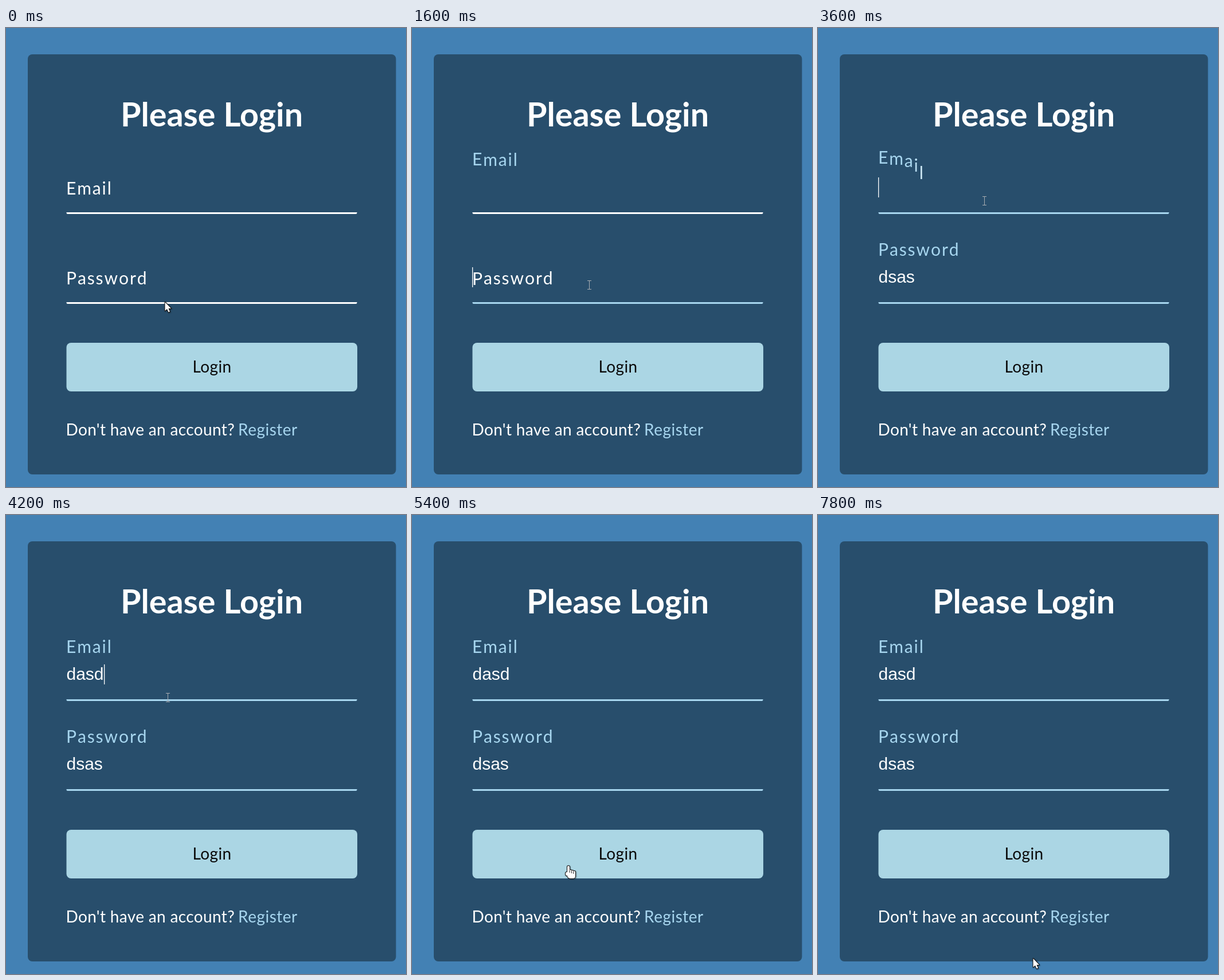
These frames come from a looping animation (698x802 px, 8000 ms). An HTML page with a canvas:

```html
<!DOCTYPE html>
<html lang="en">
<head>
<meta charset="utf-8">
<title>Login form</title>
<style>
  html, body { margin: 0; width: 100%; height: 100%; overflow: hidden; background: #4381b4; }
  canvas { display: block; }
</style>
</head>
<body>
<canvas id="stage" width="698" height="802"></canvas>
<script>
const ctx = document.getElementById('stage').getContext('2d');
const LOOP = 8000;
const FACE = 'Lato, "Open Sans", sans-serif';
const INPUT_FONT = '30px "Liberation Sans", Arial, sans-serif';
const WHITE = [255, 255, 255], SKY = [167, 214, 239];
const LEFT = 106, RIGHT = 613;
const LIFT = 50, LETTER_TIME = 350, LETTER_DELAY = 20;
const KEY_GAP = 110, GLIDE = 400;

// visits: when the field gains and loses focus
const email = { label: 'Email', base: 291, value: 'dasd', typing: 3720, visits: [[505, 1595], [3350, 5000]] };
const password = { label: 'Password', base: 448, value: 'dsas', typing: 2750, visits: [[1595, 3350]] };
const fields = [email, password];

// The pointer glides to each stop just before its time, then rests there
const stops = [
  { at: 0, x: 277, y: 478 },
  { at: 600, x: 278, y: 298 },
  { at: 1600, x: 309, y: 449 },
  { at: 2600, x: 303, y: 421 },
  { at: 3300, x: 290, y: 302 },
  { at: 4200, x: 282, y: 319 },
  { at: 5400, x: 273, y: 613 },
  { at: 5800, x: 330, y: 750 },
  { at: 6200, x: 451, y: 708 },
  { at: 7400, x: 266, y: 602 },
  { at: 7800, x: 375, y: 774 }
];

const rgb = c => `rgb(${c.map(Math.round).join()})`;
const mix = (a, b, k) => a + (b - a) * k;
const clamp = v => Math.min(1, Math.max(0, v));
const smooth = k => k * k * (3 - 2 * k);
const curve = (a, b, s) => 3 * a * s * (1 - s) ** 2 + 3 * b * s * s * (1 - s) + s ** 3;

// cubic-bezier(0.68, -0.55, 0.265, 1.55)
function backEase(x) {
  if (x <= 0) return 0;
  if (x >= 1) return 1;
  let lo = 0, hi = 1;
  for (let i = 0; i < 24; i++) {
    const mid = (lo + hi) / 2;
    if (curve(0.68, 0.265, mid) < x) lo = mid; else hi = mid;
  }
  return curve(-0.55, 1.55, lo);
}

function box(x, y, w, h, r, fill) {
  ctx.beginPath();
  ctx.roundRect(x, y, w, h, r);
  ctx.fillStyle = fill;
  ctx.fill();
}

function text(str, x, y, font, fill, align = 'left', spacing = 0) {
  ctx.font = font;
  ctx.textAlign = align;
  ctx.letterSpacing = spacing + 'px';
  ctx.fillStyle = fill;
  ctx.fillText(str, x, y);
}

function lifted({ visits, typing }, t) {
  const visit = visits.filter(([from]) => t >= from).pop();
  if (!visit) return 0;
  const [from, to] = visit;
  return t < to || t > typing
    ? backEase((t - from) / LETTER_TIME)
    : 1 - backEase((t - to) / LETTER_TIME);
}

function drawLabel(field, t) {
  let x = LEFT - 1;
  [...field.label].forEach((ch, i) => {
    const p = lifted(field, t - i * LETTER_DELAY);
    const color = rgb(WHITE.map((v, c) => mix(v, SKY[c], clamp(p))));
    text(ch, x, field.base - LIFT * p, `30px ${FACE}`, color);
    x += ctx.measureText(ch).width + 1.9;
  });
}

function drawCaret(field, value, since) {
  if (since % 1000 >= 500) return;
  const x = value ? LEFT + ctx.measureText(value).width : LEFT - 1;
  ctx.fillStyle = '#fff';
  ctx.fillRect(Math.round(x), field.base - 30, 1.3, 35);
}

function drawField(field, t) {
  const { base, typing } = field;
  const count = Math.min(field.value.length, Math.max(0, Math.ceil((t - typing) / KEY_GAP)));
  const value = field.value.slice(0, count);
  const visit = field.visits.find(([from, to]) => t >= from && t < to);
  box(LEFT - 0.5, base + 31, RIGHT - LEFT, 3, [0, 0, 2, 2], rgb(visit || value ? SKY : WHITE));
  drawLabel(field, t);
  text(value, LEFT - 0.5, base - 3, INPUT_FONT, '#fff');
  if (visit) {
    const lastKey = count ? typing + (count - 1) * KEY_GAP : visit[0];
    drawCaret(field, value, t - Math.max(visit[0], lastKey));
  }
}

function pointerAt(t) {
  const i = stops.findIndex(s => s.at > t);
  if (i < 0) return stops[stops.length - 1];
  const a = stops[i - 1], b = stops[i];
  const k = smooth(clamp(1 - (b.at - t) / GLIDE));
  return { x: mix(a.x, b.x, k), y: mix(a.y, b.y, k) };
}

function drawBeam() {
  ctx.fillStyle = '#a9aeb2';
  ctx.fillRect(0, -7, 1, 14);
  for (const y of [-8, 7]) ctx.fillRect(-3, y, 7, 1);
}

function outline(shape) {
  ctx.lineWidth = 2;
  ctx.lineJoin = 'round';
  ctx.strokeStyle = '#111';
  ctx.shadowColor = 'rgba(0,0,0,.4)';
  ctx.shadowBlur = 2;
  ctx.shadowOffsetX = ctx.shadowOffsetY = 1;
  ctx.stroke(shape);
  ctx.shadowColor = 'transparent';
  ctx.fillStyle = '#fff';
  ctx.fill(shape);
}

function drawArrow() {
  outline(new Path2D('M.5 1V16L4 13L6.5 18.5L9 17.5L6.5 12H11Z'));
}

function drawHand() {
  const shape = new Path2D();
  shape.roundRect(-2, 0, 4, 14, 2);
  shape.roundRect(-5, 11, 5, 6, 2);
  shape.roundRect(-2, 11, 14, 11, [0, 0, 4, 5]);
  for (let i = 0; i < 3; i++) shape.roundRect(2 + 3.3 * i, 7 + i, 3.4, 8, 1.7);
  outline(shape);
  ctx.fillStyle = '#111';
  for (let i = 0; i < 3; i++) ctx.fillRect(1.7 + 3.3 * i, 8 + i, 0.9, 4);
}

function drawPointer(t) {
  const { x, y } = pointerAt(t);
  const inside = (l, top, r, bottom) => x > l && x < r && y > top && y < bottom;
  const overField = fields.some(f => inside(LEFT, f.base - 38, RIGHT, f.base + 29));
  const overLink = inside(LEFT, 550, RIGHT, 635) || inside(405, 688, 510, 722);
  ctx.save();
  ctx.translate(Math.round(x), Math.round(y));
  if (overField) drawBeam();
  else if (overLink) drawHand();
  else drawArrow();
  ctx.restore();
}

function draw(t) {
  ctx.fillStyle = '#4381b4';
  ctx.fillRect(0, 0, 698, 802);
  box(38, 46, 642.5, 734, 8, '#284e6c');
  text('Please Login', 359, 172, `bold 57.5px ${FACE}`, '#fff', 'center');
  fields.forEach(f => drawField(f, t));
  box(105.5, 550, 507.5, 85, 8, '#abd6e4');
  text('Login', 359.5, 602, `28px ${FACE}`, '#0a0a0a', 'center', 0.4);
  text("Don't have an account?", 104.5, 712, `28px ${FACE}`, '#fff', 'left', 0.35);
  text('Register', 405, 712, `28px ${FACE}`, rgb(SKY), 'left', 0.5);
  drawPointer(t);
}

const start = performance.now();
function tick() {
  draw((performance.now() - start) % LOOP);
  requestAnimationFrame(tick);
}
tick();
</script>
</body>
</html>
```
